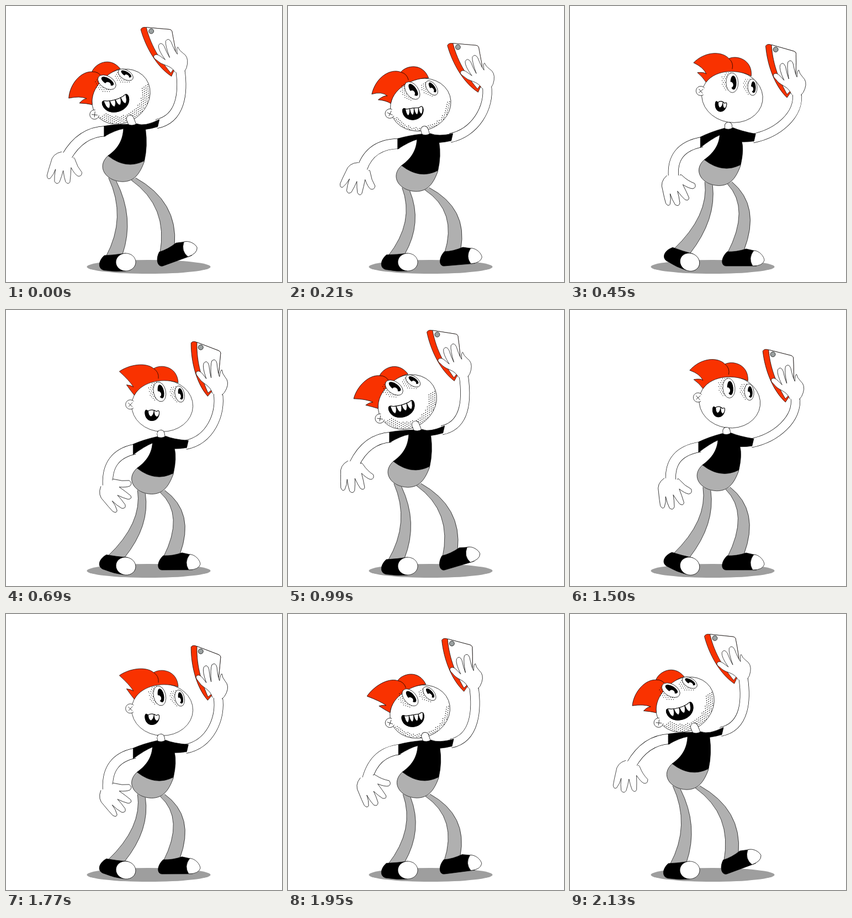
These frames come from a looping animation (500 by 500 pixels, 2160 ms). An HTML page with a canvas:

```html
<!DOCTYPE html>
<html lang="en">
<head>
<meta charset="utf-8">
<title>Selfie sway</title>
<style>
html, body { margin: 0; height: 100%; overflow: hidden; background: #fff; }
canvas { display: block; }
</style>
</head>
<body>
<canvas id="stage" width="500" height="500"></canvas>
<script>
const ctx = document.getElementById('stage').getContext('2d');
const HALF = 540, STEP = 30, LEAD = 18, LINE = 0.7;
const RED = '#f93200', GRAY = '#b0b0b0', FLOOR = '#9e9e9e';

// swing: 0 left to 1 right; rush: signed speed; bob: dip in mid swing
let swing, rush, bob;

function setTime(t) {
  const p = (t + LEAD) / HALF % 2, u = p % 1;
  const ease = u - 0.075 * Math.sin(2 * Math.PI * u);
  swing = p < 1 ? ease : 1 - ease;
  rush = Math.sin(Math.PI * p);
  bob = rush * rush;
}

const sway = (left, right, dip = 0, drag = 0) =>
  left + (right - left) * swing + dip * bob + drag * rush;
const rad = a => a * Math.PI / 180;
const between = ([ax, ay], [bx, by], dx = 0, dy = 0) => [(ax + bx) / 2 + dx, (ay + by) / 2 + dy];

// Local point of a part {x, y, turn} in stage coordinates
function place(part, x, y) {
  const c = Math.cos(rad(part.turn)), s = Math.sin(rad(part.turn));
  return [part.x + x * c - y * s, part.y + x * s + y * c];
}

function within({ x, y, turn }, draw) {
  ctx.save();
  ctx.translate(x, y);
  ctx.rotate(rad(turn));
  draw();
  ctx.restore();
}

function paint(path, fill, line = LINE) {
  const p = typeof path === 'string' ? new Path2D(path) : path;
  if (fill) { ctx.fillStyle = fill; ctx.fill(p); }
  if (line) { ctx.strokeStyle = '#000'; ctx.lineWidth = line; ctx.stroke(p); }
}

function oval(x, y, rx, ry = rx, from = 0, to = 7) {
  const p = new Path2D();
  p.ellipse(x, y, rx, ry, 0, from, to);
  return p;
}

function tube(d, width, cap = 'butt') {
  const p = new Path2D(d);
  ctx.lineCap = cap;
  for (const [color, w] of [['#000', width], ['#fff', width - 2 * LINE]]) {
    ctx.strokeStyle = color;
    ctx.lineWidth = w;
    ctx.stroke(p);
  }
  ctx.lineCap = 'butt';
}

function dots(w, top, bottom, size, inside) {
  ctx.fillStyle = '#000';
  for (let y = top, row = 0; y <= bottom; y += 3.4, row++)
    for (let x = row % 2 * 2 - w; x <= w; x += 4)
      if (inside(x, y)) ctx.fill(oval(x, y, size));
}

function leg(topL, topR, endL, endR, bendL, bendR, lift) {
  const curve = (a, b, bend) => between(a, b, 2 * bend, 2 * lift);
  paint(`M${topL} Q${curve(topL, endL, bendL)} ${endL} L${endR} Q${curve(topR, endR, bendR)} ${topR}`, GRAY);
}

function legs(torso) {
  const shoeL = { x: 217, y: 464, turn: 30 * swing ** 3 };
  const shoeR = { x: 283, y: 466, turn: -21 * (1 - swing) ** 3 };
  leg(place(torso, 42, 44), place(torso, 50, 40), place(shoeR, 2, -18), place(shoeR, 32, -23), 21, 21, -9);
  leg(place(torso, 1, 40), place(torso, 15, 46), place(shoeL, -36, -10), place(shoeL, -6, -14), 18, 14, 0);
  within(shoeL, () => {
    paint('M-39,-12 C-52,0 -50,15 -36,15 Q-18,18 0,16 L0,-16 Q-20,-13 -39,-12Z', '#000');
    paint(oval(0, 0, 18, 16), '#fff');
  });
  within(shoeR, () => {
    paint('M2,-21 C-10,-10 -10,5 0,5 L55,5 L54,-22 Q45,-24 36,-26 Q18,-20 2,-21Z', '#000');
    paint('M50,-23 C60,-23 69,-12 69,-5 Q66,5 48,5 Q39,-9 50,-23Z', '#fff');
  });
}

function eye(x, y, rx, ry) {
  within({ x, y, turn: sway(-60, 3) }, () => {
    dots(22, -18, 14, 0.65, (u, v) => u < 0 && Math.hypot((u + 6) / (rx + 3), (v + 2) / ry) < 1);
    paint(oval(0, 0, rx, ry), '#fff');
    ctx.scale(rx / 12, ry / 18.5);
    paint(oval(2.5, 0, 6, 13), '#000', 0);
    paint(oval(-3, 4, 5, 5.5), '#fff', 0);
  });
}

// A wide toothy grin that closes to a small round mouth
function mouth() {
  within({ x: sway(-8, -22), y: sway(13, 18), turn: sway(-17, 10) }, () => {
    const w = sway(25, 9), h = sway(16, 10), top = sway(-0.35, -1.2) * h;
    const p = new Path2D(`M${-w},${-.3 * h} C${-w},${-.9 * h} ${-.8 * w},${-.75 * h} ${-.6 * w},${-.6 * h}
      Q0,${top} ${.6 * w},${-.6 * h} C${.8 * w},${-.75 * h} ${w},${-.9 * h} ${w},${-.3 * h}
      C${.9 * w},${1.3 * h} ${-.9 * w},${1.3 * h} ${-w},${-.3 * h}Z`);
    paint(p, '#000');
    ctx.save();
    ctx.clip(p);
    const n = w > 15 ? 4 : 2, half = .84 * w / n, shift = sway(0, w / 3);
    for (let i = 0; i < n; i++) {
      const c = (2 * i + 1 - n) * half + shift;
      paint(`M${c - half},${-h} Q${c - half},${.1 * h} ${c},${.25 * h} Q${c + half},${.1 * h} ${c + half},${-h}Z`, '#fff');
    }
    ctx.restore();
    paint(p, null, 1);
  });
}

function hair() {
  const flap = 9 * rush, tip = [-79, -53 + flap];
  const barb = [-68 - flap / 3, -34 + flap / 3];
  paint(`M${tip} C-62,-73 -32,-79 -17,-67 C-4,-76 26,-72 28,-42 C5,-50 -36,-46 -51,-18
    Q-58,-26 ${barb} Q-58,-36 -53,-33 Q-60,-44 ${tip}Z`, RED);
  paint('M-17,-67 Q-7,-61 -8,-49', null);
}

function head([nx, ny]) {
  const skull = { x: nx + sway(-21, 9), y: ny + sway(-50, -58), turn: sway(-36, 13) };
  const band = sway(0.3, -0.12);
  within(skull, () => {
    paint(oval(0, 0, 55.5, 47), '#fff');
    dots(56, 10, 47, 0.75, (u, v) => {
      const q = Math.hypot(u / 55.5, v / 47);
      return q > 1 - band && q < 0.98;
    });
    hair();
    paint(oval(-58, -1, 8.5), '#fff', 0);
    paint(oval(-58, -1, 8.5, 8.5, 0.8, 5.5), null);
    paint('M-62,-4 L-54,3 M-54,-5 L-61,3', null);
  });
  within({ ...skull, turn: 0 }, () => {
    eye(sway(-26, 2), sway(-26, -25), 11, 18);
    eye(sway(8, 39), sway(-40, -15), 8.5, 15);
    mouth();
  });
  tube(`M${nx + sway(-4, 0)},${ny + sway(-10, -4)} L${nx},${ny}`, 14, 'round');
}

function phoneArm([sx, sy]) {
  const phone = { x: sway(261, 382), y: sway(44, 76, 10, 9), turn: sway(0, 14, 0, -6) };
  const [wx, wy] = place(phone, 52, 70);
  tube(`M${sx - 3},${sy + 1} C${sx + 42},${sy - 8} ${wx + 6},${wy + 40} ${wx},${wy}`, 17);
  within(phone, () => {
    const back = 'L33,-3 Q38,-2 38,3 Q44,30 46,60';
    paint(`M-19,-3 Q-17,-8 -10,-7 ${back} L36,82 C10,65 -10,30 -19,-3Z`, RED);
    paint(`M-9,-7 ${back} L35,76 C20,58 0,30 -9,-7Z`, '#fff');
    paint(oval(0, 0, 4.5), '#9aa0a0');
    paint(`M43,75 Q38,66 26,62 Q16,59 10,53 Q2,48 5,44 Q9,40 17,46 L25,52 Q12,34 13,26 Q17,18 23,27
      Q28,40 33,48 Q25,26 26,18 Q31,11 36,20 Q42,36 47,42 Q45,30 48,29
      Q50,35 57,40 Q67,46 65,60 Q64,68 60,73`, '#fff');
  });
}

function freeArm(shoulder) {
  const palm = { x: sway(105, 200, 0, -13), y: sway(280, 323, 10, -6), turn: sway(0, -42, 0, 28) };
  const wrist = place(palm, 4, -7);
  tube(`M${shoulder} Q${between(shoulder, wrist, sway(-9, -33), -22)} ${wrist}`, 19);
  within(palm, () => paint(`M-5,-16 Q-22,-12 -24,4 Q-28,18 -30,28 Q-29,36 -24,33 Q-18,26 -15,16
    Q-17,28 -16,38 Q-12,45 -7,39 Q-3,28 -1,18 Q1,30 4,38 Q9,44 12,38 Q13,26 13,12
    Q20,24 26,27 Q33,28 33,20 Q24,10 20,-2 Q18,-8 16,-5`, '#fff'));
}

// Drawn from the left end of the hem
function shirt() {
  const left = 14 * swing, right = 21 * swing, pit = -48 + 17 * swing;
  paint(`M-7,${left - 54} Q12,${left / 2 - 57} 36,-57 Q44,-53 52,-58 Q66,-52 93,${right - 66}
    L90,${right - 53} Q79,${(right - 53 + pit) / 2 + 1} 68,${pit}
    Q72,-18 66,9 Q33,26 0,0 C20,-14 27,-30 28,${left / 3 - 49}
    Q14,${left * 2 / 3 - 47} -7,${left - 35}Z`, '#000');
}

function draw(t) {
  setTime(t);
  ctx.fillStyle = '#fff';
  ctx.fillRect(0, 0, 500, 500);
  paint(oval(258.5, 472.5, 112, 12.5), FLOOR, 0);
  const torso = { x: sway(184, 250, 0, -4), y: sway(271, 276, 17), turn: 0 };
  legs(torso);
  within(torso, () => paint('M0,0 C-22,20 -4,46 26,47 C48,47 58,32 66,10Z', GRAY));
  head(place(torso, 44, -57));
  freeArm(place(torso, -4, -45 + 14 * swing));
  phoneArm(place(torso, 91, -59 + 21 * swing));
  within(torso, shirt);
}

ctx.lineJoin = 'round';
const start = performance.now();
function loop() {
  draw(Math.floor((performance.now() - start) / STEP) * STEP);
  requestAnimationFrame(loop);
}
loop();
</script>
</body>
</html>
```
